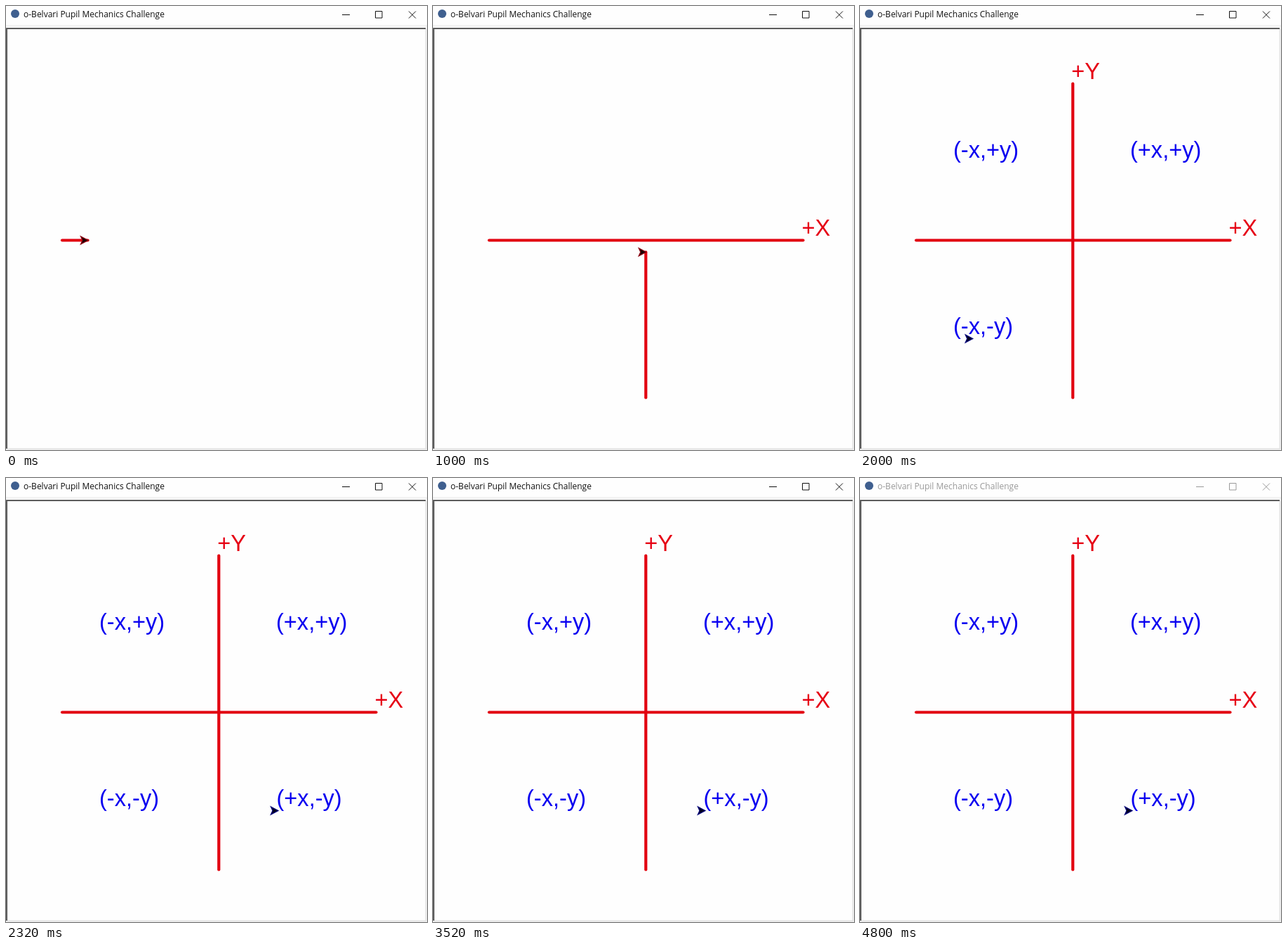
These frames come from a looping animation (600 by 632 pixels, 4920 ms). An HTML page:

```html
<!DOCTYPE html>
<html lang="en">
<head>
<meta charset="utf-8">
<title>Quadrants</title>
<style>
  html, body { margin: 0; width: 100%; height: 100%; overflow: hidden; background: #fefefe; }
  svg { display: block; width: 600px; height: 632px; }
  #bar text { font: 12px "Open Sans", "Noto Sans", sans-serif; }
  #labels text { font: 32.6px "Liberation Sans", Arial, sans-serif; }
</style>
</head>
<body>
<svg viewBox="0 0 600 632">
  <rect width="600" height="632" fill="#fefefe"/>

  <!-- window frame -->
  <path d="M0 28.5H600" stroke="#f3f3f3" stroke-width="3"/>
  <path d="M598.5 31V630.5H0" fill="none" stroke="#e4e4e4" stroke-width="2"/>
  <path d="M1 630V32H598" fill="none" stroke="#5c5c5c" stroke-width="2"/>

  <circle cx="13" cy="11" r="6" fill="#3f5f8f"/>
  <g id="bar">
    <text x="25" y="16" fill="currentColor">o-Belvari Pupil Mechanics Challenge</text>
    <path d="M479 12.5H490M526.5 7.5H536V17H526.5ZM574 7.5L584 17.5M584 7.5L574 17.5"
          fill="none" stroke="currentColor"/>
  </g>

  <g stroke="#e20010" stroke-width="4.2" stroke-linecap="round">
    <line id="xAxis"/>
    <line id="yAxis"/>
  </g>
  <g id="labels"></g>
  <path id="pen" d="M0 0L-10.5 -5.5L-8 0L-10.5 5.5Z" stroke-width="1.3"/>
</svg>

<script>
const LOOP = 4920, RED = '#e60014', BLUE = '#0a00f0';
const $ = id => document.getElementById(id);

// Pen route: each leg runs at constant speed, then writes its label.
const start = { x: 80, y: 333.5 };
const legs = [
  { from: -37,  to: 416,  x: 527.5, y: 333.5, label: '+X', color: RED, axis: 'xAxis' },
  { from: 450,  to: 762,  x: 303.3, y: 557.5 },
  { from: 790,  to: 1243, x: 303.3, y: 110.5, label: '+Y', color: RED, axis: 'yAxis' },
  { from: 1290, to: 1437, x: 387,   y: 223,   label: '(+x,+y)', color: BLUE },
  { from: 1475, to: 1725, x: 135,   y: 223,   label: '(-x,+y)', color: BLUE },
  { from: 1725, to: 1975, x: 135,   y: 473.5, label: '(-x,-y)', color: BLUE },
  { from: 1975, to: 2225, x: 387.5, y: 473.5, label: '(+x,-y)', color: BLUE }
];

for (const leg of legs) {
  if (!leg.label) continue;
  leg.text = document.createElementNS('http://www.w3.org/2000/svg', 'text');
  leg.text.textContent = leg.label;
  leg.text.setAttribute('x', leg.x - 2);
  leg.text.setAttribute('y', leg.y - 6.8);
  leg.text.setAttribute('fill', leg.color);
  $('labels').append(leg.text);
}

function setLine(id, a, b, visible) {
  const line = $(id);
  line.style.visibility = visible ? 'visible' : 'hidden';
  const ends = { x1: a.x, y1: a.y, x2: b.x, y2: b.y };
  for (const k in ends) line.setAttribute(k, ends[k]);
}

function draw(t) {
  let prev = start, pos = start;
  for (const leg of legs) {
    const p = Math.min(1, Math.max(0, (t - leg.from) / (leg.to - leg.from)));
    const point = {
      x: prev.x + (leg.x - prev.x) * p,
      y: prev.y + (leg.y - prev.y) * p
    };
    if (p > 0) pos = point;
    if (leg.axis) setLine(leg.axis, prev, point, p > 0);
    if (leg.text) leg.text.style.visibility = p === 1 ? 'visible' : 'hidden';
    prev = leg;
  }
  const pen = $('pen');
  pen.setAttribute('transform', `translate(${pos.x + 0.5} ${pos.y})`);
  pen.setAttribute('fill', t < 1260 ? '#180000' : '#00001c');
  pen.setAttribute('stroke', t < 1260 ? '#8a0010' : '#000078');
  $('bar').style.color = t < 4800 ? '#111' : '#999';
}

// The picture refreshes in alternating holds of 120 and 80 ms.
function frame(now) {
  const t = now % LOOP, pair = Math.floor(t / 200) * 200;
  draw(pair + (t - pair >= 120 ? 120 : 0));
  requestAnimationFrame(() => frame(performance.now() - t0));
}
const t0 = performance.now();
frame(0);
</script>
</body>
</html>
```
